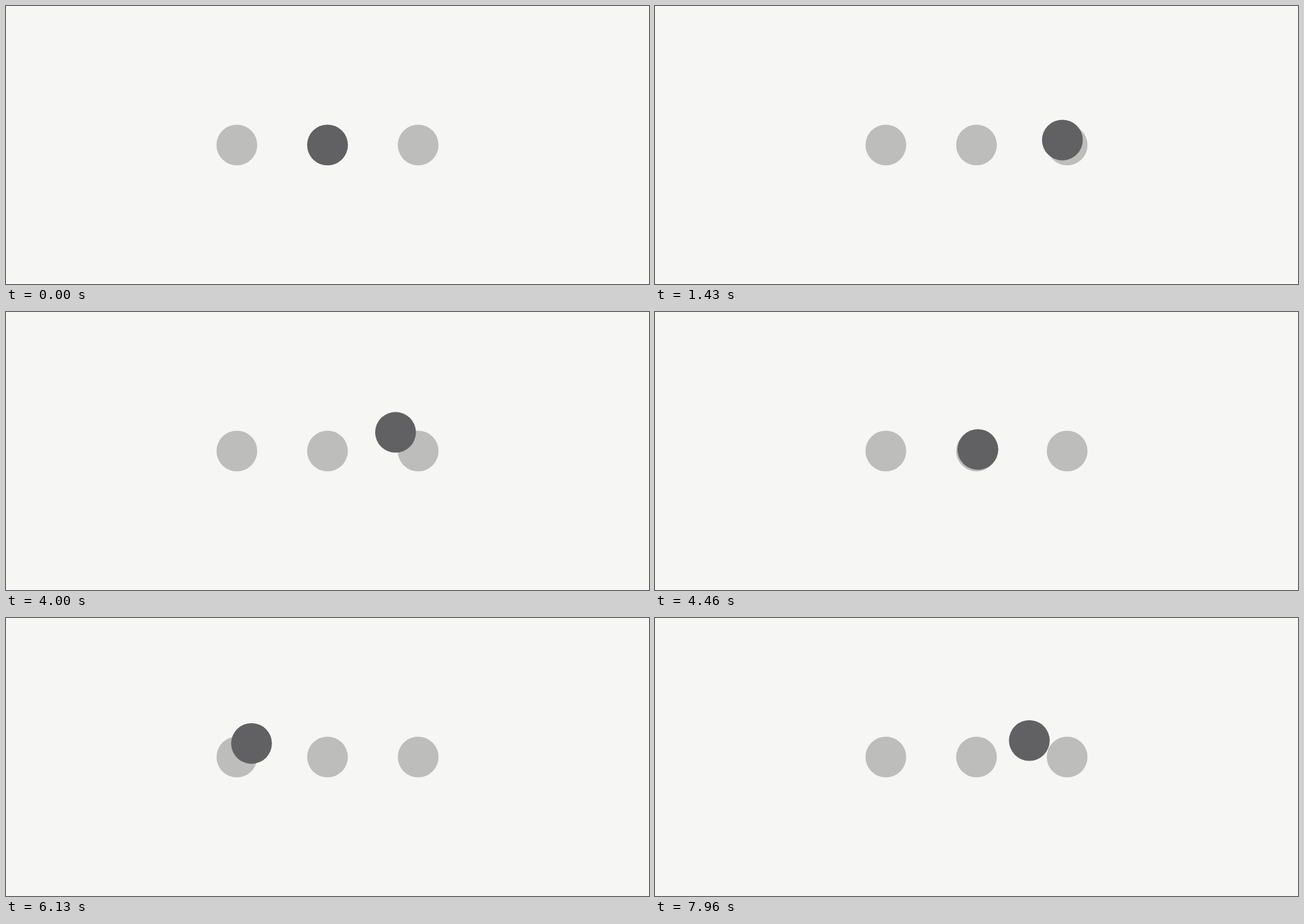
Recreate the animation shown at these times as an HTML page. Size 1080x468 px, loop 8 s.

```html
<!DOCTYPE html>
<html lang="en">
<head>
<meta charset="utf-8">
<title>Page dots</title>
<style>
  html, body { margin: 0; width: 100%; height: 100%; overflow: hidden; background: #f6f6f4; }
  svg { display: block; width: 100%; height: 100%; }
</style>
</head>
<body>
<svg viewBox="0 0 1080 468">
  <g fill="#bdbdbb">
    <circle cx="387.75" cy="234" r="34.25"/>
    <circle cx="540" cy="234" r="34.25"/>
    <circle cx="692.25" cy="234" r="34.25"/>
  </g>
  <circle id="dot" cx="540" cy="234" r="34.25" fill="#616163"/>
</svg>
<script>
const LOOP = 8000, BASE = 234, LIFT = 42, TAU = 118;
const LEFT = 387.75, MID = 540, RIGHT = 692.25;

// Each hop is dragged slowly to "pull" of the way, then let go and snaps home.
const hops = [
  { from: MID,   to: RIGHT, start: 170,  release: 1115, pull: 0.235, power: 1.23 },
  { from: RIGHT, to: MID,   start: 2670, release: 4000, pull: 0.243, power: 1.3 },
  { from: MID,   to: LEFT,  start: 5760, release: 5950, pull: 0.25,  power: 2 },
  { from: LEFT,  to: RIGHT, start: 7570, release: 7815, pull: 0.281, power: 2 }
];

const dot = document.getElementById("dot");

function progress(hop, t) {
  if (t <= hop.start) return 0;
  if (t < hop.release) {
    const k = (t - hop.start) / (hop.release - hop.start);
    return hop.pull * Math.pow(k, hop.power);
  }
  return 1 - (1 - hop.pull) * Math.exp((hop.release - t) / TAU);
}

function draw(t) {
  const hop = hops.filter(h => h.start <= t).pop() || hops[0];
  const u = progress(hop, t);
  dot.setAttribute("cx", hop.from + (hop.to - hop.from) * u);
  dot.setAttribute("cy", BASE - LIFT * 4 * u * (1 - u));
}

const begin = performance.now();
function tick() {
  draw((performance.now() - begin) % LOOP);
  requestAnimationFrame(tick);
}
tick();
</script>
</body>
</html>
```
